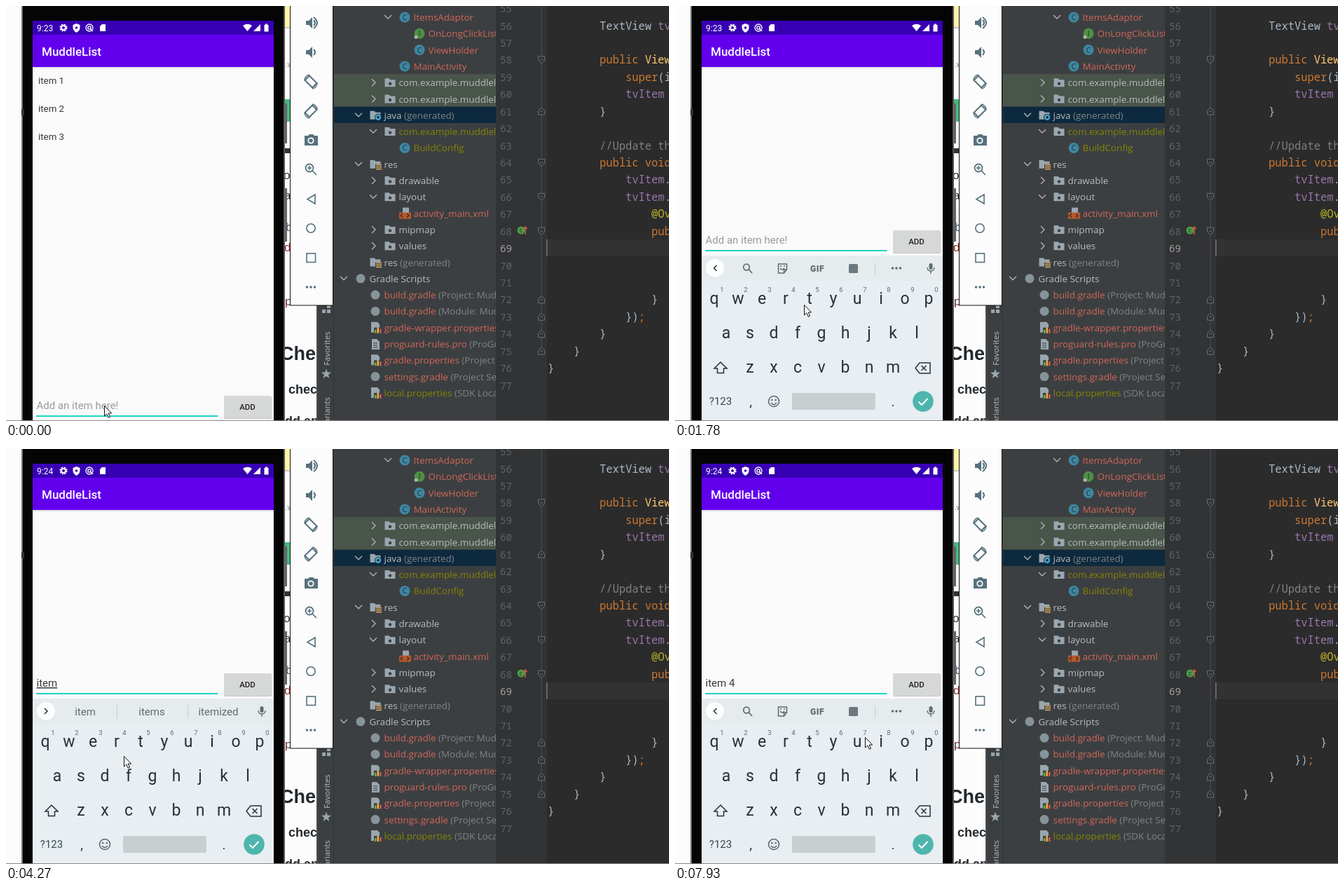
An HTML page that plays this animation: 946x592 px, repeating every 8 s.

```html
<!DOCTYPE html>
<html lang="en">
<head>
<meta charset="utf-8">
<title>Todo app in an emulator</title>
<style>
html, body { margin: 0; width: 100%; height: 100%; overflow: hidden; background: #2b2b2b; }
svg { display: block; width: 946px; height: 592px; }
text { white-space: pre; }
.app { font-family: Roboto, sans-serif; }
.ide { font-family: "Open Sans", "Noto Sans", sans-serif; font-size: 13.4px; }
.code { font-family: "Noto Sans Mono", "DejaVu Sans Mono", monospace; font-size: 15.4px; }
.web { font-family: "Liberation Sans", Arial, sans-serif; }
</style>
</head>
<body>
<svg id="stage" viewBox="0 0 946 592"></svg>
<script>
const stage = document.getElementById('stage');
const APP = 'MuddleList';
const C = {
  panel: '#3c3f41', gray: '#9aa7b0', dim: '#808486', plain: '#bbbbbb', red: '#d1675a', olive: '#848504',
  orange: '#cc7832', purple: '#9876aa', code: '#a9b7c6', tool: '#56717c', key: '#263238', soft: '#5f6b70', teal: '#1fd3c6'
};

const rect = (x, y, w, h, fill, more = '') => `<rect x="${x}" y="${y}" width="${w}" height="${h}" fill="${fill}" ${more}/>`;
const disc = (x, y, r, fill) => `<circle cx="${x}" cy="${y}" r="${r}" fill="${fill}"/>`;
const ring = (x, y, r, color, w = 1.5) => `<circle cx="${x}" cy="${y}" r="${r}" fill="none" stroke="${color}" stroke-width="${w}"/>`;
const line = (d, color, w = 1.5, more = '') => `<path d="${d}" fill="none" stroke="${color}" stroke-width="${w}" ${more}/>`;
const fill = (d, color, more = '') => `<path d="${d}" fill="${color}" ${more}/>`;
const text = (x, y, s, color, more = '') => `<text x="${x}" y="${y}" fill="${color}" ${more}>${s}</text>`;
const span = (s, color) => `<tspan fill="${color}">${s}</tspan>`;
const at = (x, y, s, id = '') => `<g ${id && `id="${id}"`} transform="translate(${x} ${y})">${s}</g>`;
const group = (cls, s) => `<g class="${cls}">${s}</g>`;
const mid = 'text-anchor="middle"';
const dots = (x, y, color) => [-5.5, 0, 5.5].map(d => disc(x + d, y, 1.8, color)).join('');

function webPage() {
  return rect(0, 0, 445, 592, '#fcfcfc') + rect(397, 0, 9, 30, '#fff3a8') + rect(397, 30, 9, 2, '#c9c9c9') +
    rect(397, 133, 9, 32, '#43b97f') + rect(397, 203, 9, 7, '#333') +
    group('web', text(399, 87, '.w', '#777', 'font-size="10"') +
      text(396, 247, 'o', '#333', 'font-size="17"') + text(397, 276, 'a', '#333', 'font-size="17"') +
      text(399, 321, 'b', '#246', 'font-size="17"') + text(397, 350, 'd', '#933', 'font-size="17"') +
      text(398, 427, 'p', '#733', 'font-size="17"') +
      text(391, 505, 'Chec', '#24292e', 'font-size="27" font-weight="700"') +
      text(403, 553, 'chec', '#24292e', 'font-size="18" font-weight="700"') +
      text(398, 598, 'dd an', '#24292e', 'font-size="18" font-weight="700"'));
}

const icons = {
  cls: (x, y) => disc(x, y, 7.5, '#3e86a0') + text(x, y + 4, 'C', '#23363f', `${mid} font-size="11"`),
  iface: (x, y) => disc(x, y, 7.5, '#4f8f45') + text(x, y + 4, 'I', '#1f331c', `${mid} font-size="11"`) + disc(x - 5, y + 5, 2.5, '#a9b7a9'),
  folder: (x, y) => fill(`M${x - 7.5} ${y - 6}h6l2 2h7v10h-15z`, C.gray) + disc(x, y + 1.5, 2.2, C.panel),
  gen: (x, y) => fill(`M${x - 7.5} ${y - 6}h6l2 2h7v10h-15z`, C.gray) + disc(x + 4, y + 3, 5, '#0d293e') + ring(x + 4, y + 3, 3, '#4ba3c7', 2.4),
  res: (x, y) => fill(`M${x - 7.5} ${y - 6}h6l2 2h7v10h-15z`, C.gray) + rect(x, y, 9, 8, C.panel) +
    [1, 4, 7].map(d => rect(x + 1, y + d - 1, 8, 1.8, '#c9a25c')).join(''),
  xml: (x, y) => fill(`M${x - 3} ${y - 8}h9v8h-9z`, C.gray) + rect(x - 8, y - 1, 17, 9, '#b5582f') +
    line(`M${x - 3} ${y + 1}l-3 2.5 3 2.5M${x + 3} ${y + 1}l3 2.5-3 2.5`, '#3b2a22', 1.3),
  build: (x, y) => disc(x, y, 6.5, '#87939a'),
  props: (x, y) => fill(`M${x - 6} ${y - 8}h9l3 3v12h-12z`, C.gray) + rect(x - 2, y, 11, 9, C.panel) +
    rect(x - 1, y + 3, 2.5, 5, '#62b543') + rect(x + 2.5, y, 2.5, 8, '#f4af3d') + rect(x + 6, y + 2, 2.5, 6, '#e05555'),
  file: (x, y) => fill(`M${x - 5} ${y - 7}h7l4 4v11h-11z`, C.gray) + line(`M${x - 3} ${y - 1}h6m-6 3h6m-6 3h6`, C.panel, 1.2)
};

function tree() {
  const pkg = 'com.example.' + APP.toLowerCase();
  const rows = [ // depth, arrow, icon, label, color, note
    [3, 'v', 'cls', 'ItemsAdaptor', C.red], [4, '', 'iface', 'OnLongClickListener', C.red], [4, '', 'cls', 'ViewHolder', C.red],
    [3, '', 'cls', 'MainActivity', C.red], [2, '>', 'folder', pkg, C.plain], [2, '>', 'folder', pkg, C.plain],
    [1, 'v', 'gen', 'java', C.plain, '(generated)'], [2, 'v', 'folder', pkg, C.olive], [3, '', 'cls', 'BuildConfig', C.olive],
    [1, 'v', 'res', 'res', C.plain], [2, '>', 'folder', 'drawable', C.plain], [2, 'v', 'folder', 'layout', C.plain],
    [3, '', 'xml', 'activity_main.xml', C.red], [2, '>', 'folder', 'mipmap', C.plain], [2, '>', 'folder', 'values', C.plain],
    [1, '', 'res', 'res', C.plain, '(generated)'], [0, 'v', 'build', 'Gradle Scripts', C.plain],
    [1, '', 'build', 'build.gradle', C.red, `(Project: ${APP})`], [1, '', 'build', 'build.gradle', C.red, `(Module: ${APP}.app)`],
    [1, '', 'props', 'gradle-wrapper.properties', C.red], [1, '', 'file', 'proguard-rules.pro', C.red, '(ProGuard Rules)'],
    [1, '', 'props', 'gradle.properties', C.red, '(Project Properties)'], [1, '', 'build', 'settings.gradle', C.red, '(Project Settings)'],
    [1, '', 'props', 'local.properties', C.olive, '(SDK Location)']
  ];
  const body = rows.map(([depth, arrow, icon, label, color, note], i) => {
    const y = 16 + i * 23.3, x = 506 + depth * 21, ax = x - 24;
    const mark = arrow && line(arrow === 'v' ? `M${ax - 5} ${y - 3}l5 5 5-5` : `M${ax - 2} ${y - 5}l5 5-5 5`, '#afb1b3', 1.4);
    return mark + icons[icon](x, y) + text(x + 12.5, y + 5, span(label, color) + (note ? span(' ' + note, C.dim) : ''), color);
  }).join('');
  return rect(443, 0, 256, 592, C.panel) + rect(468, 97, 231, 46, '#49544a') + rect(468, 144, 231, 23, '#0d293e') + group('ide', body);
}

function sideStrip() {
  const star = Array.from({ length: 10 }, (_, i) => {
    const a = i * Math.PI / 5, r = i % 2 ? 3 : 7.5;
    return `${457 + r * Math.sin(a)} ${525 - r * Math.cos(a)}`;
  }).join('L');
  const side = (y, s, anchor) => `<text transform="translate(462 ${y}) rotate(-90)" fill="#bbb" font-size="11.5" text-anchor="${anchor}">${s}</text>`;
  return rect(467, 427, 1, 165, '#323435') + rect(443, 427, 2, 165, '#4b4e50') +
    rect(451, 433, 5, 5, C.gray) + rect(458, 433, 5, 5, C.gray) + rect(458, 426, 5, 5, C.gray) +
    group('ide', side(488.5, 'Favorites', 'middle') + side(558, 'Build Variants', 'end')) + fill('M' + star + 'z', C.gray);
}

function editor() {
  const lineY = n => 28 + (n - 56) * 24.43;
  const { code, orange, purple } = C;
  const lines = { // line number: indent, then text and color pairs
    56: [2, 'TextView ', code, 'tvItem;', purple], 58: [2, 'public ', orange, 'ViewHolder', '#ffc66d'],
    59: [3, 'super', orange, '(itemView);', code], 60: [3, 'tvItem ', purple, ' = ', code], 61: [2, '}', code],
    63: [2, '//Update the view', '#808080'], 64: [2, 'public void ', orange], 65: [3, 'tvItem', purple, '.setText', code],
    66: [3, 'tvItem', purple, '.setOn', code], 67: [4, '@Override', '#bbb529'], 68: [4, 'public', orange],
    72: [4, '}', code], 73: [3, '})', code, ';', orange], 74: [2, '}', code], 75: [1, '}', code], 76: [0, '}', code]
  };
  let out = rect(699, 0, 73, 592, '#313335') + rect(772, 0, 174, 592, '#2b2b2b') + rect(772, 333, 174, 24, '#323232') +
    rect(771, 333, 1.5, 24, '#777') + line('M764 0V490', '#4d5052', 1);
  for (let n = 55; n <= 77; n++) out += text(705, lineY(n) + 5.5, n, n === 69 ? '#a4a3a3' : '#606366', 'font-size="14"');
  for (const [n, [indent, ...parts]] of Object.entries(lines)) {
    let s = '';
    for (let i = 0; i < parts.length; i += 2) s += span(parts[i], parts[i + 1]);
    out += text(773 + indent * 37, lineY(+n) + 5.5, s, code);
  }
  for (const n of [58, 61, 64, 66, 68, 72, 73, 74, 75]) {
    const flip = [58, 64, 66, 68].includes(n) ? 1 : -1;
    out += `<path transform="translate(764 ${lineY(n)}) scale(1 ${flip})" d="M-4.5-5h9v6l-4.5 4-4.5-4z" fill="#313335" stroke="#6b6e70"/>` +
      line(`M762 ${lineY(n)}h4`, '#6b6e70', 1);
  }
  return group('code', out + disc(735, 320, 5.5, '#4f9b45') + text(735, 323, 'c', '#1f331c', `${mid} font-size="9"`) +
    line('M741 326v-11m-2.500 3l2.500-3 2.500 3', '#d6574f', 1.5));
}

function toolbar() {
  const c = C.tool, x = 435;
  const speaker = (y, loud) => fill(`M${x - 7} ${y - 3}h4l5-5v16l-5-5h-4z`, c) + line(`M${x + 4} ${y - 4}q4 4 0 8`, c, 2) +
    (loud ? line(`M${x + 4} ${y - 8}q10 8 0 16`, c, 2) : '');
  const rotate = (y, flip) => `<g transform="translate(${x} ${y}) scale(${flip} 1)">` +
    rect(-4.5, -7.5, 9, 15, 'none', `transform="rotate(-45)" stroke="${c}" stroke-width="2"`) +
    line('M-9-2q1-7 7-8M9 2q-1 7-7 8', c, 1.6) + '</g>';
  return rect(405.5, -1, 61, 428, '#fcfcfc', 'stroke="#111"') + speaker(24, true) + speaker(66, false) + rotate(108, 1) + rotate(150, -1) +
    fill('M426 185h5l2-2h5l2 2h5v14h-19z', c) + disc(x, 192, 4.600, '#fcfcfc') + disc(x, 192, 2.800, c) +
    ring(433, 231, 5.500, c, 1.800) + line('M437 235l6 6M430 231h6m-3-3v6', c, 1.700) +
    line('M441 269v13l-11-6.500z', c, 1.600) + ring(x, 317, 6.200, c, 1.600) +
    rect(429, 353, 12.500, 12.500, 'none', `stroke="${c}" stroke-width="1.600"`) + dots(x, 401, c);
}

function phone() {
  const w = '#fff';
  const teeth = ring(82, 31, 4.5, w, 2.2).replace('/>', ' stroke-dasharray="2.2 1.33"/>');
  const list = [1, 2, 3].map(n => text(46, 70.5 + n * 40, 'item ' + n, '#383838', 'font-size="13.3"')).join('');
  return rect(23, 0, 375, 592, '#050505') + rect(22, 0, 2, 592, '#777') + rect(22, 147, 4, 9, '#333') + rect(396, 0, 2, 592, '#555') +
    rect(397, 139, 4, 57, '#666') + rect(397, 260, 4, 76, '#666') +
    rect(38, 87, 344, 505, '#fafafa') + rect(38, 87, 344, 2, '#e4e4e4') + rect(38, 21, 344, 20, '#3700b3') + rect(38, 41, 344, 46, '#6200ee') +
    text(44, 35.5, '9:23', w, 'id="clock" font-size="12"') + ring(82, 31, 3, w, 2) + teeth +
    fill('M100.500 25l5 2v4q0 4-5 7-5-3-5-7v-4z', w) + disc(100.500, 31, 1.800, '#3700b3') +
    ring(119, 31, 5, w, 1.300) + ring(119, 31, 2.200, w, 1.300) + line('M120 32l4 4', w, 1.300) +
    fill('M137 26h5v10h-8v-7z', w) + fill('M338 28q6.500-4.500 13 0l-6.500 8z', w) + fill('M363 26v10h-10z', w) + rect(368.500, 27, 6, 9.500, w) + rect(370, 25.500, 3, 2, w) +
    text(51, 71, APP, w, 'font-size="17" font-weight="500"') + `<g id="list">${list}</g>` +
    at(0, 0, text(43.5, 575, '', '#383838', 'id="field" font-size="15"') + rect(43, 584, 259.5, 2, C.teal) + rect(0, 558, 1.8, 21, C.teal, 'id="caret"') +
      rect(311, 557, 68, 32, '#c4c5c5', 'rx="2"') + rect(311, 556, 67.5, 32, '#d6d7d7', 'rx="2"') +
      text(344.5, 576.2, 'ADD', '#222', `${mid} font-size="11.5" font-weight="500"`), 'input');
}

function keyboard() {
  const c = C.soft, k = C.key;
  const row = (keys, x, y) => [...keys].map((ch, i) => text(x + i * 34, y, ch, k, `${mid} font-size="23"`)).join('');
  const digits = [...'1234567890'].map((d, i) => text(67 + i * 34, 408, d, c, `${mid} font-size="9.5"`)).join('');
  const tools = line('M59.500 370l-4 4 4 4', k) + ring(102, 372.500, 4.300, c, 1.700) + line('M105 375.500l5 5.500', c, 1.800) +
    line('M147.500 368h12v8l-4 5h-8zM159.500 376h-4v5M150 374q3 4 6 0', c, 1.500) + disc(151, 371, 1, c) + disc(156, 371, 1, c) +
    text(203, 378.500, 'GIF', c, `${mid} font-size="12" font-weight="900" letter-spacing="0.600"`) + rect(248, 368, 13, 13, '#6d797e', 'rx="1.500"') +
    rect(285, 366, 1, 18, '#c8ced1') + dots(316, 374, c);
  const words = line('M55 370l4 4-4 4', k) + rect(158, 365, 1, 19, '#c8ced1') + rect(259, 365, 1, 19, '#c8ced1') +
    [113, 208, 303].map(x => text(x, 380, '', c, `class="word" ${mid} font-size="15"`)).join('');
  return rect(38, 356, 344, 236, '#e8eef1') + rect(38, 356, 344, 36, '#e6ebee') + disc(57, 374.5, 13, '#d4dadd') + disc(57, 374, 13, '#fcfdfd') +
    `<g id="tools">${tools}</g><g id="words">${words}</g>` +
    rect(362.500, 367, 5, 9, c, 'rx="2.500"') + line('M360 373q0 5 5 5t5-5M365 378v4', c, 1.400) +
    row('qwertyuiop', 56, 425) + digits + row('asdfghjkl', 73, 474) + row('zxcvbnm', 107, 523) +
    line('M65 508l9 9h-4.500v6.500h-9v-6.500h-4.500z', k, 1.500) + line('M349 509h15v15h-15l-6-7.500zM351.500 513l7 7m0-7l-7 7', k, 1.500) +
    text(65, 569, '?123', '#37474f', `${mid} font-size="15"`) + text(108, 571, ',', k, `${mid} font-size="19"`) + text(311, 571, '.', k, `${mid} font-size="19"`) +
    ring(141, 564, 7.500, c, 1.600) + disc(138.300, 562, 1.300, c) + disc(143.700, 562, 1.300, c) + line('M137 566q4 5 8 0', c, 1.500) +
    rect(167, 552, 119, 24, '#c9ced1', 'rx="2"') + disc(354, 564, 14.8, '#4db6ac') + line('M347.500 564.500l4.500 4.500 8.500-9', '#fff', 2);
}

stage.innerHTML = webPage() + tree() + sideStrip() + editor() + group('app', phone() + at(0, 0, keyboard(), 'keys')) + toolbar() +
  rect(0, 591, 946, 1, '#8d8587') +
  at(0, 0, fill('M0.500 0.500v14.500l3.300-3.200 2.400 5.400 2.300-1-2.400-5.200h4.500z', '#fff', 'stroke="#111"'), 'cursor');

const el = id => document.getElementById(id);
const parts = Object.fromEntries(['clock', 'list', 'input', 'field', 'caret', 'keys', 'tools', 'words', 'cursor'].map(id => [id, el(id)]));
const wordEls = stage.querySelectorAll('.word');

const start = { cursor: [140, 570], clock: '9:23', typed: '', caret: false, caretX: 43.5, raised: false, keys: null, words: null, draft: false };
const type = (typed, caretX, words) => ({ typed, caretX, words, caret: true, draft: true });
const blink = caret => ({ caret });
const move = (x, y) => ({ cursor: [x, y] });
const events = [
  [150, move(139, 570)], [300, blink(true)], [420, { raised: true }], [660, { keys: 60 }], [800, { keys: 0, caret: false }],
  [1230, { ...move(172, 462), caret: true }], [1380, move(184, 438)], [1500, move(195, 416)],
  [1780, { ...move(184, 426), caret: false }], [1930, move(177, 425)], [2070, move(172, 432)], [2200, move(168, 437)],
  [2320, { ...move(168, 438), caret: true }], [2720, blink(false)],
  [3090, { ...type('i', 47.5, null), clock: '9:24' }], [3210, type('it', 52, ['it', 'it\'s', 'its'])],
  [3490, type('ite', 60, ['item', 'items', 'ite'])], [3740, type('item', 73, ['item', 'items', 'itemized'])],
  [4270, blink(false)], [4390, { typed: 'item ', caretX: 76.3, caret: true, draft: false }], [4510, { words: ['is', 'in', 'and'] }],
  [4880, blink(false)], [5410, blink(true)], [5910, blink(false)], [6030, { typed: 'item 4', caretX: 85, caret: true }],
  [6160, { words: null }], [6530, blink(false)], [7030, blink(true)],
  [7400, move(176, 437)], [7520, { ...move(205, 436), caret: false }], [7640, move(237, 439)], [7790, move(239, 451)], [7930, move(271, 411)]
];

function render(t) {
  const s = Object.assign({}, start, ...events.filter(([time]) => time <= t).map(([, change]) => change));
  const show = (node, on) => node.setAttribute('visibility', on ? 'visible' : 'hidden');
  const keysOn = s.keys !== null;
  parts.clock.textContent = s.clock;
  parts.field.textContent = s.typed || 'Add an item here!';
  parts.field.setAttribute('fill', s.typed ? '#383838' : '#9a9a9a');
  parts.field.setAttribute('text-decoration', s.draft ? 'underline' : 'none');
  parts.caret.setAttribute('x', s.caretX);
  show(parts.caret, s.caret);
  show(parts.list, !s.raised);
  parts.input.setAttribute('transform', `translate(0 ${s.raised ? -236 : 0})`);
  show(parts.keys, keysOn);
  parts.keys.setAttribute('transform', `translate(0 ${s.keys || 0})`);
  show(parts.tools, keysOn && !s.words);
  show(parts.words, keysOn && s.words);
  wordEls.forEach((node, i) => { node.textContent = s.words ? s.words[i] : ''; });
  parts.cursor.setAttribute('transform', `translate(${s.cursor})`);
}

const began = performance.now();
function frame() {
  render((performance.now() - began) % 8000);
  requestAnimationFrame(frame);
}
render(0);
requestAnimationFrame(frame);
</script>
</body>
</html>
```
